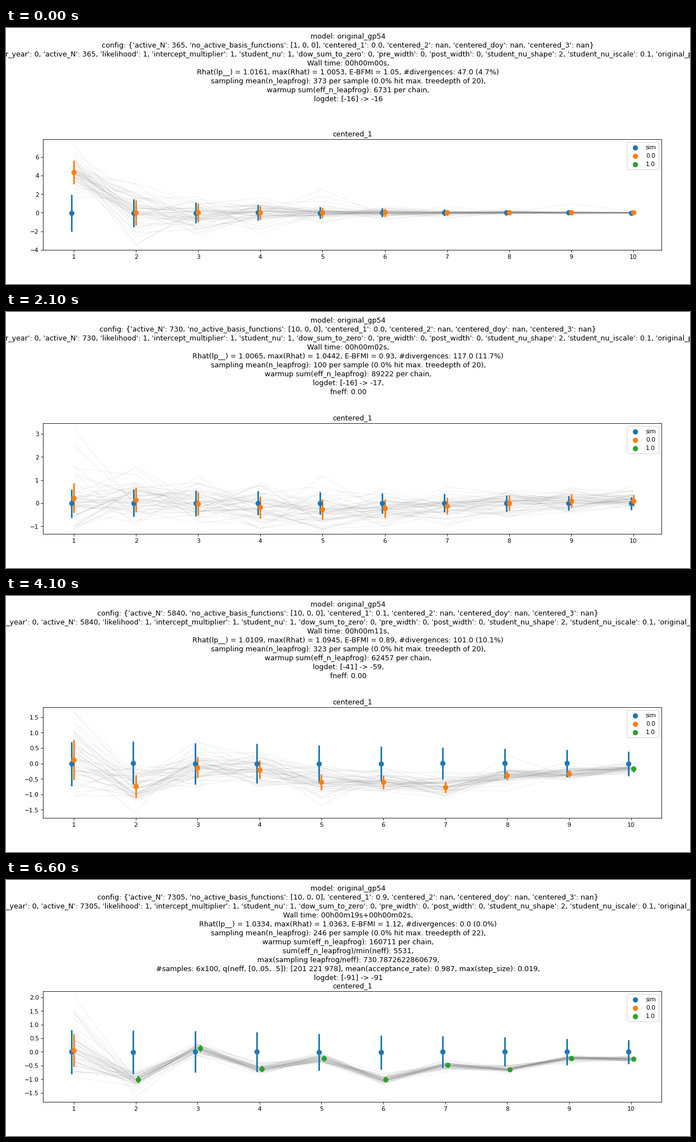
Write a matplotlib script that moves like this. It is 1222 px wide and 458 px high and loops after 7.1 s.

```python
import numpy as np
import matplotlib.pyplot as plt
from matplotlib.animation import FuncAnimation
from matplotlib.collections import LineCollection

plt.rcParams["font.family"] = "DejaVu Sans"

DPI = 76.4
WIDTH, HEIGHT = 16 * DPI, 6 * DPI
LEFT, RIGHT, TOP, BOTTOM = 66.3, 1171.2, 198.9, 397.4   # axes box in pixels
BLUE, ORANGE, GREEN = "tab:blue", "tab:orange", "tab:green"
FONT = 11.95
BAR = 2.7
DOT = dict(s=2 * np.pi * BAR ** 2, linewidth=0.75 * BAR)

X = np.arange(1, 11)
DODGE = 0.04
SAMPLES = 50
LAST = 14
KEYS = [0, 2, 5, 7, 9, 11, 14]            # fits with known values
CENTER_ORDER = [10, 9, 8, 7, 6, 5, 3, 2, 4, 1]
LOW_LEGEND = {3, 10, 13}

# Coefficient profiles: start, a few basis functions, smooth wave, then settling
MEANS = np.array([
    np.where(X == 1, 4.35, 0),
    np.pad([1.07, 1.0, -0.13, -1.65], (0, 6)),
    0.27 * np.cos(0.72 * (X - 1)) * np.exp(-0.06 * (X - 1)) - 0.05,
    [0.11, -0.58, -0.8, -0.12, -0.35, -1.19, -0.94, -0.14, -0.63, -0.25],
    [0.12, -0.74, -0.13, -0.2, -0.6, -0.6, -0.77, -0.39, -0.33, -0.18],
    [0.06, -1.01, 0.14, -0.62, -0.24, -1.01, -0.49, -0.64, -0.24, -0.26],
])


def key(k, *values):
    """Value at fit k, interpolated between the key fits."""
    return np.interp(k, KEYS[:len(values)], values)


def active_days(k):
    doublings = min(max(k - 4, 0), (k - 1) // 2) if k else 0
    return min(365 * 2 ** doublings, 7305)


def centered_count(k):
    return round(np.interp(k, [7, 8, 9, 11, 12], [0, 1, 1, 8, 9]))


def heading(k):
    n, last = active_days(k), k == LAST
    seconds = round(np.interp(k, [0, 2, 5, 7, 9, 13], [0, 1, 2, 5, 11, 19]))
    wall = f"00h00m{seconds:02d}s" + ("+00h00m02s" if last else "")
    rhat = key(k, 1.0161, 1.0247, 1.0065, 1.0088, 1.0109, 1.0167, 1.0334)
    max_rhat = key(k, 1.0053, 1.0152, 1.0442, 1.1113, 1.0945, 1.0116, 1.0363)
    bfmi = key(k, 1.05, 0.96, 0.93, 0.94, 0.89, 0.84, 1.12)
    div = round(key(k, 47, 130, 117, 111, 101, 77, 0))
    leapfrog = round(key(k, 373, 194, 100, 264, 323, 127, 246))
    warmup = round(key(k, 6731, 103886, 89222, 51900, 62457, 108521, 160711))
    before = round(key(k, -16, -15, -16, -29, -41, -77, -91))
    after = round(key(k, -16, -18, -17, -41, -59, -87, -91))

    lines = [
        "model: original_gp54",
        f"config: {{'active_N': {n}, 'no_active_basis_functions': "
        f"[{min(2 ** k, 10)}, 0, 0], 'centered_1': {centered_count(k) / 10}, "
        "'centered_2': nan, 'centered_doy': nan, 'centered_3': nan}",
        f"{{'days_per_year': 0, 'active_N': {n}, 'likelihood': 1, "
        "'intercept_multiplier': 1, 'student_nu': 1, 'dow_sum_to_zero': 0, "
        "'pre_width': 0, 'post_width': 0, 'student_nu_shape': 2, "
        "'student_nu_iscale': 0.1, 'original_proper': 0}",
        f"Wall time: {wall},",
        f"Rhat(lp__) = {rhat:.4f}, max(Rhat) = {max_rhat:.4f}, "
        f"E-BFMI = {bfmi:.2f}, #divergences: {div:.1f} ({div / 10:.1f}%)",
        f"sampling mean(n_leapfrog): {leapfrog} per sample "
        f"(0.0% hit max. treedepth of {22 if last else 20}),",
        f"warmup sum(eff_n_leapfrog): {warmup} per chain,",
    ]
    if last:
        lines += [
            "sum(eff_n_leapfrog)/min(neff): 5531,",
            "max(sampling leapfrog/neff): 730.7872622860679,",
            "#samples: 6x100, q(neff, [0,.05, .5]): [201 221 978], "
            "mean(acceptance_rate): 0.987, max(step_size): 0.019,",
        ]
    logdet = f"logdet: [{before}] -> {after}"
    lines += [logdet] if k == 0 or last else [logdet + ",", "fneff: 0.00"]
    return "\n".join(lines)


def prior_sd(k):
    """Simulated spread, decaying over the coefficients."""
    first = key(k, 2.0, 1.35, 0.61, 0.95, 0.715, 0.76, 0.81)
    last = key(k, 0.15, 0.46, 0.28, 0.59, 0.4, 0.43, 0.44)
    return first * (last / first) ** (((X - 1) / 9) ** min(1 + 0.2 * k, 1.5))


def posterior_sd(k):
    """Share of the prior spread that is left after seeing the data."""
    first = np.interp(k, [0, 2, 5, 14], [0.62, 0.9, 1.05, 0.75])
    second = np.interp(k, [7, 11], [0.9, 0.17])
    last = np.interp(k, [5, 7, 11], [0.9, 0.35, 0.12])
    return prior_sd(k) * np.interp(X, [1, 2, 10], [first, second, last])


def draws(rng, k, mid, sd, low, high):
    """Posterior samples, heavier tailed for the unused coefficients."""
    tail = np.linspace(0.1, max(0.2, 1.4 - 0.3 * k), 10)
    size = (SAMPLES, 10)
    z = rng.normal(size=size) * np.exp(tail * rng.normal(size=size) - tail ** 2)
    pad = 0.0455 * (high - low)
    y = np.clip(mid + sd * z, low + pad, high - pad)
    # The extreme samples reach the padded limits
    y[0, 0] = high - pad
    y[1, np.argmin(mid - 2 * sd)] = low + pad
    return y


def points(x, y, half, color):
    ax.vlines(x, y - half, y + half, color=color, linewidth=BAR, zorder=2)
    ax.scatter(x, y, color=color, zorder=3, **DOT)


def draw_fit(k):
    rng = np.random.default_rng(40 + k)
    low = key(k, -4.02, -3.53, -1.34, -2.94, -1.77, -1.41, -1.84)
    high = key(k, 7.9, 8.58, 3.46, 2.84, 1.82, 1.44, 2.22)
    mid = np.array([key(k, *column) for column in MEANS.T])
    sd, sim = posterior_sd(k), prior_sd(k)
    green = np.isin(X, CENTER_ORDER[:centered_count(k)])

    ax.clear()
    samples = draws(rng, k, mid, sd, low, high)
    ax.add_collection(LineCollection([np.column_stack([X, y]) for y in samples],
                                     colors="gray", alpha=0.12, linewidths=1,
                                     zorder=1.9))
    points(X - DODGE, 0.015 * sim * rng.normal(size=10), sim, BLUE)
    points(X[~green], mid[~green], sd[~green], ORANGE)
    points(X[green] + DODGE, mid[green], sd[green], GREEN)

    x0, x1 = 1 - DODGE, 10 + DODGE * green.any()
    margin = 0.05 * (x1 - x0)
    ax.set_xlim(x0 - margin, x1 + margin)
    ax.set_ylim(low, high)
    ax.set_xticks(X)
    ax.set_title("centered_1", fontsize=FONT)
    handles = [ax.scatter([], [], color=c, label=name, **DOT)
               for c, name in ((BLUE, "sim"), (ORANGE, "0.0"), (GREEN, "1.0"))]
    ax.legend(handles=handles, fontsize=10,
              loc="lower right" if k in LOW_LEGEND else "upper right").set_zorder(5)
    head.set_text(heading(k))


def update(i):
    # The first fit shows for one tick, every later one for five
    k = (i + 4) // 5
    if k != shown["fit"]:
        draw_fit(k)
        shown["fit"] = k
    return []


shown = {"fit": None}
fig = plt.figure(figsize=(16, 6), dpi=DPI, facecolor="white")
ax = fig.add_axes([LEFT / WIDTH, (458 - BOTTOM) / HEIGHT,
                   (RIGHT - LEFT) / WIDTH, (BOTTOM - TOP) / HEIGHT])
head = fig.text(0.5, 0.98, "", ha="center", va="top", fontsize=FONT,
                linespacing=1.3)

anim = FuncAnimation(fig, update, frames=71, interval=100, repeat=True,
                     repeat_delay=0, blit=False)
plt.show()
```
